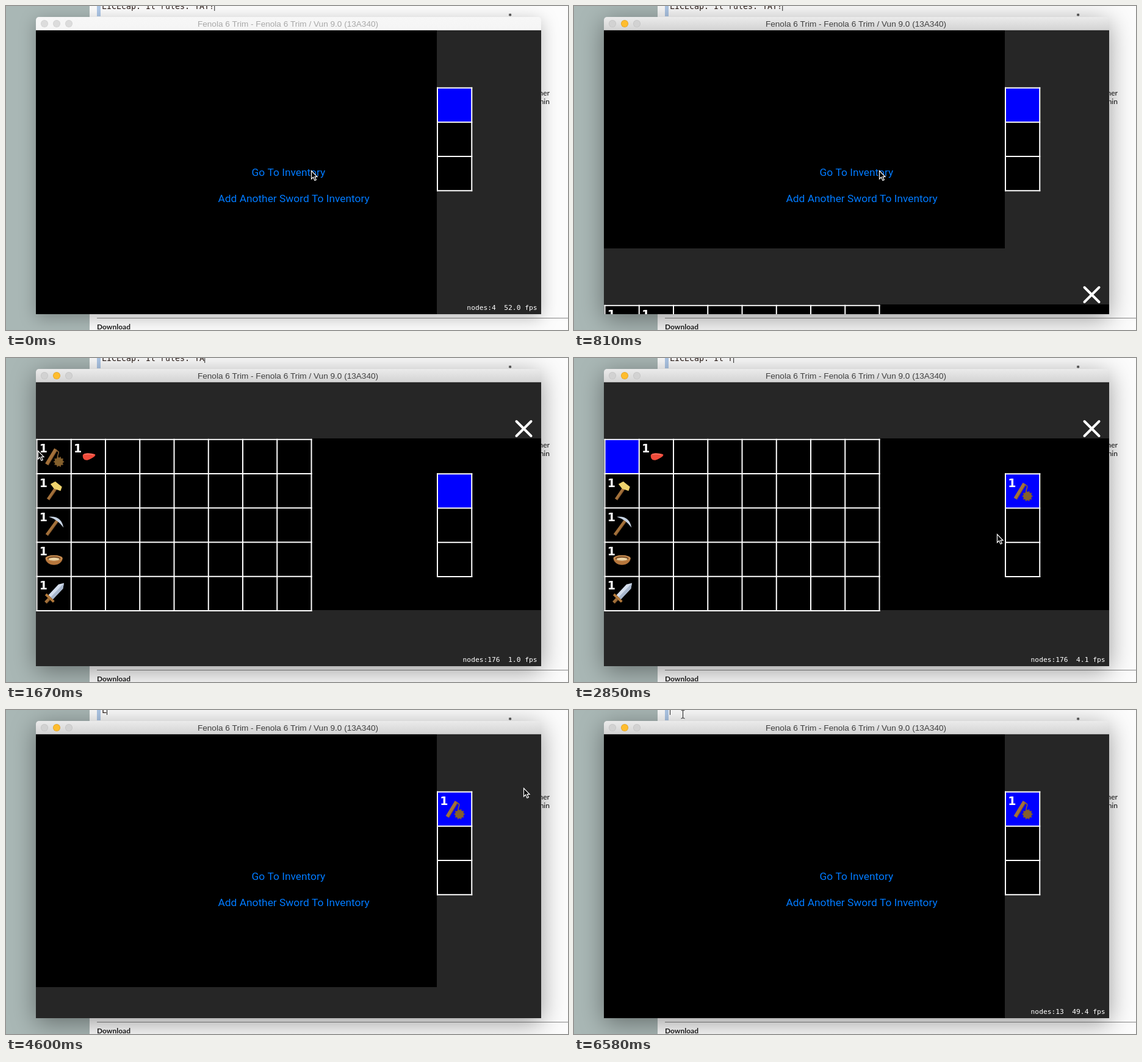
Write an HTML page with a canvas that moves like this. It is 921 by 532 pixels and loops after 6730 ms.

```html
<!DOCTYPE html>
<html lang="en">
<head>
<meta charset="utf-8">
<title>Inventory demo</title>
<style>
html, body { margin: 0; width: 100%; height: 100%; overflow: hidden; background: #fcfcfc; }
canvas { display: block; }
</style>
</head>
<body>
<canvas id="stage" width="921" height="532"></canvas>
<script>
const ctx = document.getElementById('stage').getContext('2d');
const LOOP = 6730, STEP = 146.7, PHASE = 50;
const ACTIVATE = 490, OPEN = 707, SELECT = 1950, EQUIP = 2690, CLOSE = 4304, SLIDE = 330;
const WIN = { x: 49, y: 18, w: 828, h: 488, top: 40 };
const VIEW_H = 466, CELL = 56.25;
const TYPED = 'LICEcap. It rules. YAY!';
const TITLE = 'Fenola 6 Trim - Fenola 6 Trim / Vun 9.0 (13A340)';
const DARK = '#262626', WOOD = '#a3713b', MONO = '"DejaVu Sans Mono", monospace';

// Pointer moves: when each starts and ends, and where it goes.
const HOME = { x: 500, y: 270 };
const MOVES = [
  { from: 990, to: 1640, x: 52, y: 152 },
  { from: SELECT, to: 2400, x: 731, y: 213 },
  { from: EQUIP, to: 2830, x: 693, y: 289 },
  { from: 3290, to: 3870, x: 848, y: 128 },
  { from: 4900, to: 5680, x: 225, y: 508 },
  { from: 5680, to: 6240, x: 178, y: 7 }
];

const clamp = v => Math.max(0, Math.min(1, v));
const span = (t, from, to) => clamp((t - from) / (to - from));
const smooth = p => p * p * (3 - 2 * p);

function rect(x, y, w, h, fill) {
  ctx.fillStyle = fill;
  ctx.fillRect(x, y, w, h);
}

function text(str, x, y, font, fill, align = 'left') {
  ctx.font = font;
  ctx.fillStyle = fill;
  ctx.textAlign = align;
  ctx.fillText(str, x, y);
}

function shape(path, fill) {
  ctx.fillStyle = fill;
  ctx.fill(new Path2D(path));
}

function stroke(path, color, width, cap = 'butt') {
  ctx.strokeStyle = color;
  ctx.lineWidth = width;
  ctx.lineCap = cap;
  ctx.stroke(new Path2D(path));
}

function ellipse(x, y, rx, ry, fill, end = Math.PI * 2) {
  ctx.beginPath();
  ctx.ellipse(x, y, rx, ry, 0, 0, end);
  ctx.fillStyle = fill;
  ctx.fill();
}

function placed(x, y, angle, paint) {
  ctx.save();
  ctx.translate(x, y);
  ctx.rotate(angle);
  paint();
  ctx.restore();
}

function haft(x, y, w, h) {
  rect(x, y, w, h, WOOD);
  rect(x + w - 1, y, 1, h, '#7c5026');
}

// Items are drawn around the middle of their cell; tools stand upright, then tilt.
const items = {
  mace() {
    placed(0, 0, 0.54, () => haft(-6.6, -12, 6, 29));
    stroke('M3 -10 C14 -8 1 -1 8 3', '#8a6233', 1.6);
    for (let i = 0; i < 5; i++) placed(8, 8.5, i * Math.PI / 5, () => rect(-8.5, -1, 17, 2, '#7c5729'));
    ellipse(8, 8.5, 7, 7, '#84602d');
  },
  hammer() {
    placed(0, 0, 0.6, () => {
      haft(-2.5, -6, 5, 23);
      shape('M-11 -6 L-7 -14 L7 -13 L9 -6 L-2 -3 Z', '#efd36d');
    });
  },
  pickaxe() {
    placed(0, 0, 0.63, () => {
      haft(-2.5, -11, 5, 31);
      shape('M-15 -6 Q0 -20 15 -6 Q0 -11 -15 -6 Z', '#c7d4e4');
    });
  },
  bowl() {
    ellipse(0, -2, 14, 11, '#b6763c', Math.PI);
    ellipse(0, -2, 14, 5, '#c98d50');
    ellipse(0, -1.5, 11, 3.5, '#754a25');
    ellipse(0, -0.5, 9, 2.5, '#ecd3a4');
  },
  sword() {
    placed(0, 0, 0.755, () => {
      shape('M0 -24 L5 -16 V8 H-5 V-16 Z', '#d4deed');
      shape('M0 -24 L5 -16 V8 H0 Z', '#a9b8ce');
      rect(-9, 8, 18, 4, '#b57b3c');
      haft(-2.5, 12, 5, 8);
    });
  },
  meat() {
    shape('M-9 -3 C-6 -7 3 -6 11 -4 C13 -1 8 1 3 4 C-4 8 -10 5 -9 -3 Z', '#ef4a3a');
    stroke('M-6 -4 Q2 -5 8 -3', '#ff7565', 1.5, 'round');
  }
};

function item(name, x, y) {
  placed(x + CELL / 2, y + CELL / 2, 0, items[name]);
  text('1', x + 4.3, y + 21.5, 'bold 19px "DejaVu Sans", sans-serif', '#fff');
}

function slots(x, y, cols, rows) {
  for (let i = 0; i <= cols; i++) stroke(`M${x + i * CELL} ${y} v${rows * CELL}`, '#fff', 2, 'square');
  for (let j = 0; j <= rows; j++) stroke(`M${x} ${y + j * CELL} h${cols * CELL}`, '#fff', 2, 'square');
}

function hotbar(y, filled) {
  const x = 707;
  rect(x, y, CELL, CELL * 3, '#000');
  rect(x, y, CELL, CELL, '#00f');
  slots(x, y, 1, 3);
  if (filled) item('mace', x, y);
}

function mainScene(filled) {
  rect(WIN.x, WIN.top, WIN.w, VIEW_H, DARK);
  rect(WIN.x, WIN.top, 657, VIEW_H, '#000');
  hotbar(134.5, filled);
  const font = '17.35px Roboto, sans-serif';
  text('Go To Inventory', 462.8, 279, font, '#007aff', 'center');
  text('Add Another Sword To Inventory', 471.6, 322, font, '#007aff', 'center');
}

function bagScene(selected, filled) {
  const x = 50.5, y = 133.8;
  rect(WIN.x, WIN.top, WIN.w, VIEW_H, DARK);
  rect(WIN.x, 132, WIN.w, 282, '#000');
  if (selected) rect(x, y, CELL, CELL, '#00f');
  slots(x, y, 8, 5);
  if (!filled) item('mace', x, y);
  ['hammer', 'pickaxe', 'bowl', 'sword'].forEach((n, i) => item(n, x, y + (i + 1) * CELL));
  item('meat', x + CELL, y);
  hotbar(190.2, filled);
  stroke('M836.5 104 l24 24 m0 -24 l-24 24', '#fff', 4, 'round');
}

function page(t, step) {
  rect(0, 0, 921, 532, '#fcfcfc');
  rect(0, 0, 137, 532, '#a9b7b5');
  rect(149, 0, 6, 17, '#afc8e8');

  // One letter is deleted per refresh; the caret blinks while nothing is typed.
  const left = Math.max(0, Math.min(TYPED.length, 32 - step));
  const typing = left > 0 && left < TYPED.length;
  text(TYPED.slice(0, left), 157, 5, '13.3px ' + MONO, '#2b1d18');
  if (typing || Math.floor((t + 220) / 400) % 2 === 0) rect(157 + left * 8.01, 0, 1, 8, '#222');

  text('*', 826, 20, 'bold 10px "DejaVu Sans", sans-serif', '#222', 'center');
  text('another', 891, 147, '500 12px Lato, sans-serif', '#222', 'right');
  text('within', 891, 161, '500 12px Lato, sans-serif', '#222', 'right');
  rect(149, 512, 772, 1, '#858585');
  text('Download', 149, 531, 'bold 12px Lato, sans-serif', '#1c1c1c');
}

function frame(active) {
  ctx.save();
  ctx.shadowColor = active ? 'rgba(0,0,0,.4)' : 'rgba(0,0,0,.28)';
  ctx.shadowBlur = active ? 40 : 28;
  ctx.shadowOffsetY = active ? 8 : 6;
  ctx.beginPath();
  ctx.roundRect(WIN.x, WIN.y, WIN.w, WIN.h, [5, 5, 0, 0]);
  const bar = ctx.createLinearGradient(0, WIN.y, 0, WIN.top);
  bar.addColorStop(0, active ? '#ebebeb' : '#f7f7f7');
  bar.addColorStop(1, active ? '#d3d3d3' : '#f5f5f5');
  ctx.fillStyle = bar;
  ctx.fill();
  ctx.restore();
  rect(WIN.x, WIN.top - 1, WIN.w, 1, active ? '#b4b4b4' : '#d8d8d8');
  for (let i = 0; i < 3; i++) {
    const lit = active && i === 1;
    ellipse(63 + i * 20, 29, 6, 6, lit ? '#dfa023' : active ? '#c3c3c3' : '#d0d0d0');
    ellipse(63 + i * 20, 29, 5.2, 5.2, lit ? '#ffbd2e' : active ? '#d2d2d2' : '#dcdcdc');
  }
  text(TITLE, 462, 34, '13.6px "Liberation Sans", Arial, sans-serif', active ? '#404040' : '#a8a8a8', 'center');
}

function pointer(t) {
  let { x, y } = HOME;
  for (const m of MOVES) {
    const p = smooth(span(t, m.from, m.to));
    x += (m.x - x) * p;
    y += (m.y - y) * p;
  }
  const overText = t >= MOVES[MOVES.length - 1].to;
  placed(Math.round(x), Math.round(y), 0, () => {
    if (overText) return stroke('M-2.5 -7 l3 1 l3 -1 m-3 1 v12 m-3 1 l3 -1 l3 1', '#222', 1);
    const arrow = 'M.5 .5 V14 L3.5 11 L6 16.5 L8.3 15.5 L6 10.3 H10 Z';
    shape(arrow, '#000');
    stroke(arrow, '#fff', 1.2);
  });
}

function stats(t) {
  let nodes = 4, fps = 52;
  if (t >= CLOSE + SLIDE) [nodes, fps] = [13, 49.4];
  else if (t >= OPEN) [nodes, fps] = [176, 1 + 4.8 * (1 - Math.exp(-Math.max(0, t - 1664) / 1131))];
  text(`nodes:${nodes}  ${fps.toFixed(1)} fps`, 870.5, 499, '11.25px ' + MONO, '#fff', 'right');
}

function draw(time) {
  const step = Math.floor((time - PHASE) / STEP);
  const t = Math.max(0, step * STEP + PHASE);
  const filled = t >= EQUIP;
  const shown = span(t, OPEN, OPEN + SLIDE) - span(t, CLOSE, CLOSE + SLIDE);

  page(t, step);
  frame(t >= ACTIVATE);
  ctx.save();
  ctx.beginPath();
  ctx.rect(WIN.x, WIN.top, WIN.w, VIEW_H);
  ctx.clip();
  mainScene(filled);
  if (shown > 0) {
    ctx.translate(0, Math.round(VIEW_H * (1 - shown)));
    bagScene(t >= SELECT, filled);
  }
  ctx.restore();
  const sliding = shown > 0.01 && shown < 0.99;
  if (!sliding) stats(t);
  pointer(t);
}

let start;
function tick(now) {
  start ??= now;
  draw((now - start) % LOOP);
  requestAnimationFrame(tick);
}
draw(0);
requestAnimationFrame(tick);
</script>
</body>
</html>
```
